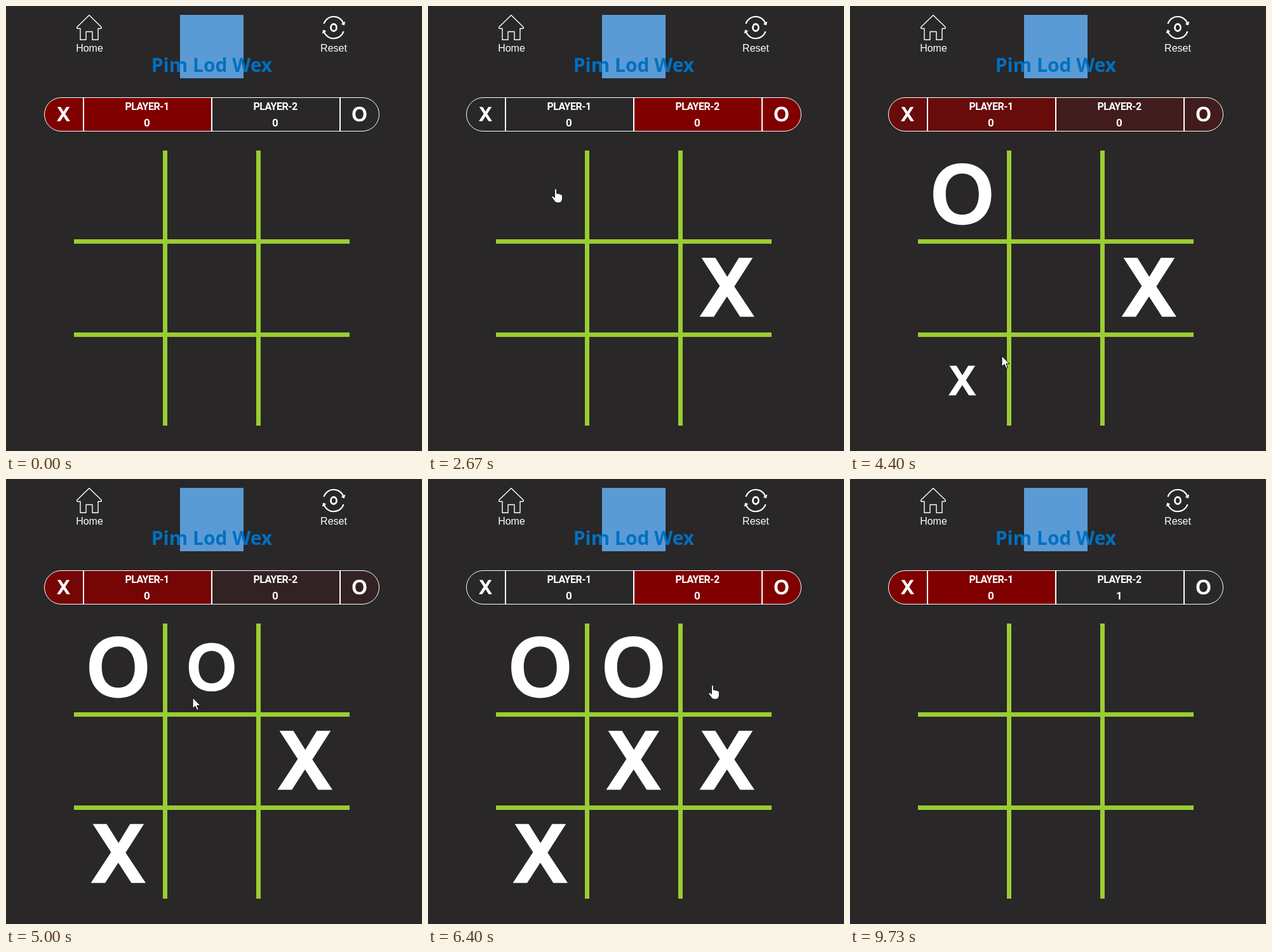
Write an HTML page that moves like this. It is 655 px wide and 702 px high and loops after 9940 ms.

```html
<!DOCTYPE html>
<html lang="en">
<head>
<meta charset="utf-8">
<title>Noughts and crosses</title>
<style>
  html, body { margin: 0; width: 100%; height: 100%; overflow: hidden; background: #292728; }
  svg { display: block; width: 655px; height: 702px; }
  text { fill: #fff; text-anchor: middle; font-family: "Liberation Sans", Arial, sans-serif; }
  .label { font-size: 16px; }
  .player { font: 700 16px Roboto, sans-serif; letter-spacing: -.5px; }
  .score { font: 700 17px Roboto, sans-serif; }
  .title { font: 700 30px "Noto Sans", sans-serif; fill: #0070c0; }
  .line { fill: none; stroke: #fff; }
</style>
</head>
<body>
<svg viewBox="0 0 655 702">
  <defs>
    <path id="X" d="M-43.2 46.5L-11.4 -2L-40.2 -46.5H-18.3L.4 -16.6L18.6 -46.5H40.4L11.5 -1.3L43.2 46.5H20.6L0 14.4L-20.7 46.5Z"/>
    <path id="O" fill-rule="evenodd" d="M-45.7 0C-45.7 -30 -28 -48.7 0 -48.7S45.7 -30 45.7 0S28 48.7 0 48.7S-45.7 30 -45.7 0Z
      M-26 0C-26 -21 -15.5 -32.5 0 -32.5S26 -21 26 0S15.5 32.5 0 32.5S-26 21 -26 0Z"/>
  </defs>
  <rect width="655" height="702" fill="#292728"/>

  <path class="line" stroke-width="1.4" stroke-linejoin="round"
    d="M131 14.5L112 33Q111 35.5 113 35.5H117V53.3H126V40.5H136V53.3H145V35.5H149Q151 35.5 150 33Z"/>
  <text class="label" x="131.5" y="72">Home</text>

  <rect x="274" y="14" width="100" height="100" fill="#5b9bd5"/>
  <text class="title" x="324" y="104">Pim Lod Wex</text>

  <g class="line" stroke-width="2.2">
    <path d="M500.5 28A16.3 16.3 0 0 1 531.5 28M531.5 40A16.3 16.3 0 0 1 500.5 40"/>
    <path fill="#fff" stroke-width="1" d="M533.5 25L532.5 30L528.5 28.5ZM498.5 43L499.5 38L503.5 39.5Z"/>
    <ellipse cx="516" cy="34" rx="4.5" ry="5.5" stroke-width="2.8"/>
  </g>
  <text class="label" x="516" y="72">Reset</text>

  <path id="side1" d="M323 144.5H87.5A27 26.5 0 0 0 87.5 197.5H323Z"/>
  <path id="side2" d="M325 144.5H560.5A27 26.5 0 0 1 560.5 197.5H325Z"/>
  <rect class="line" x="60.5" y="144.5" width="527" height="53" rx="26.5"/>
  <path class="line" stroke-width="2" d="M122 145V197M324 145V197M526 145V197"/>
  <use href="#X" fill="#fff" transform="translate(90.5 170.5) scale(.242)"/>
  <use href="#O" fill="#fff" transform="translate(556.5 170.5) scale(.242)"/>
  <text class="player" x="222" y="164">PLAYER-1</text>
  <text class="player" x="424" y="164">PLAYER-2</text>
  <text class="score" x="222" y="190">0</text>
  <text class="score" x="424" y="190" id="score2">0</text>

  <path stroke="#9acd32" stroke-width="7" d="M250.5 228V662M397.5 228V662M107 371.5H541M107 518.5H541"/>
  <g id="marks"></g>
  <rect id="popup" x="74" y="692" width="500" height="120" rx="20" fill="#3c3c3c"/>

  <g id="cursor" fill="#fff" stroke="#000" stroke-linejoin="round">
    <path id="arrow" d="M0 0V17L4 13.4L6.7 19.5L9.3 18.4L6.7 12.4H12Z"/>
    <path id="hand" stroke-width=".8" d="M-1.5 1.5Q0 -1 1.5 1.5V8Q3 6.6 4.5 8.4Q6 7.2 7.5 9.2Q10.5 8.6 10.5 12V16Q10 19 8.5 21.5Q4 23.5 -.5 21.5Q-3 18 -6 14Q-6 11 -3.4 12.6L-1.5 14.5Z"/>
  </g>
</svg>
<script>
const LOOP = 9940, WIN = 6500, RESET = 9515, TURN_MS = 200;
const GROW_MS = 180, START_SCALE = .37, CELL = 147;
const $ = id => document.getElementById(id);

// time, column, row, mark
const moves = [
  [1336, 2, 1, "X"], [2700, 0, 0, "O"], [4363, 0, 2, "X"],
  [4882, 1, 0, "O"], [5720, 1, 1, "X"], [WIN, 2, 0, "O"]
].map(([time, col, row, sign]) => ({ time, col, row, sign }));

// start, end, then the points of a quadratic curve
const trips = [
  [100, 730, 662, 706, 560, 530, 487, 426],
  [1700, 2530, 487, 426, 360, 350, 201, 288],
  [3560, 4200, 201, 288, 390, 400, 239, 552],
  [4530, 4730, 239, 552, 260, 430, 294, 345],
  [5370, 5680, 294, 345, 310, 385, 322, 425],
  [5840, 6400, 322, 425, 390, 410, 448, 325],
  [6650, 7270, 448, 325, 560, 470, 647, 690],
  [7640, 7730, 647, 690, 655, 700, 664, 712]
];

const clamp = v => Math.max(0, Math.min(1, v));
const smooth = v => v * v * (3 - 2 * v);

// CSS "ease": cubic-bezier(.25, .1, .25, 1)
function ease(x) {
  if (x <= 0 || x >= 1) return clamp(x);
  let low = 0, high = 1, s;
  for (let i = 0; i < 20; i++) {
    s = (low + high) / 2;
    const at = .75 * s * (1 - s) + s ** 3;
    if (at < x) low = s; else high = s;
  }
  return .3 * s * (1 - s) ** 2 + 3 * s * s * (1 - s) + s ** 3;
}

for (const move of moves) {
  move.node = document.createElementNS("http://www.w3.org/2000/svg", "use");
  move.node.setAttribute("href", "#" + move.sign);
  $("marks").append(move.node);
}

function sideColour(share) {
  const mix = (from, to) => Math.round(from + (to - from) * share);
  return `rgb(${mix(41, 128)},${mix(39, 0)},${mix(40, 0)})`;
}

function secondPlayerShare(t) {
  let share = 0;
  for (const { time, sign } of moves) {
    if (time === WIN || t < time) break;
    const p = ease((t - time) / TURN_MS);
    share = sign === "X" ? p : 1 - p;
  }
  return t < RESET ? share : 1 - ease((t - RESET) / TURN_MS);
}

function cursorAt(t) {
  const trip = trips.filter(([start]) => start <= t).pop() || trips[0];
  const [start, end, x0, y0, x1, y1, x2, y2] = trip;
  const p = smooth(clamp((t - start) / (end - start)));
  const curve = (a, b, c) => (1 - p) ** 2 * a + 2 * p * (1 - p) * b + p * p * c;
  return [curve(x0, x1, x2), curve(y0, y1, y2)];
}

function drawCursor(t) {
  const [x, y] = cursorAt(t);
  const col = Math.floor((x - 107) / CELL), row = Math.floor((y - 228) / CELL);
  const onBoard = x >= 107 && x < 541 && y >= 228 && y < 662;
  const taken = moves.some(m => t >= m.time && m.col === col && m.row === row);
  const pointing = onBoard && !taken && t < WIN;
  $("cursor").setAttribute("transform", `translate(${x} ${y})`);
  $("hand").style.display = pointing ? "" : "none";
  $("arrow").style.display = pointing ? "none" : "";
}

function draw(t) {
  const won = t >= WIN, playing = t < RESET;
  for (const { time, col, row, sign, node } of moves) {
    const scale = START_SCALE + (1 - START_SCALE) * clamp((t - time) / GROW_MS);
    node.style.display = playing && t >= time ? "" : "none";
    node.style.fill = won && sign === "O" ? "#f00" : "#fff";
    node.setAttribute("transform",
      `translate(${176.8 + CELL * col} ${296.8 + CELL * row}) scale(${scale})`);
  }
  const share = secondPlayerShare(t);
  $("side1").style.fill = sideColour(1 - share);
  $("side2").style.fill = sideColour(share);
  $("score2").textContent = won ? 1 : 0;
  $("popup").style.display = won && playing ? "" : "none";
  drawCursor(t);
}

const began = performance.now();
function tick() {
  draw((performance.now() - began) % LOOP);
  requestAnimationFrame(tick);
}
tick();
</script>
</body>
</html>
```
